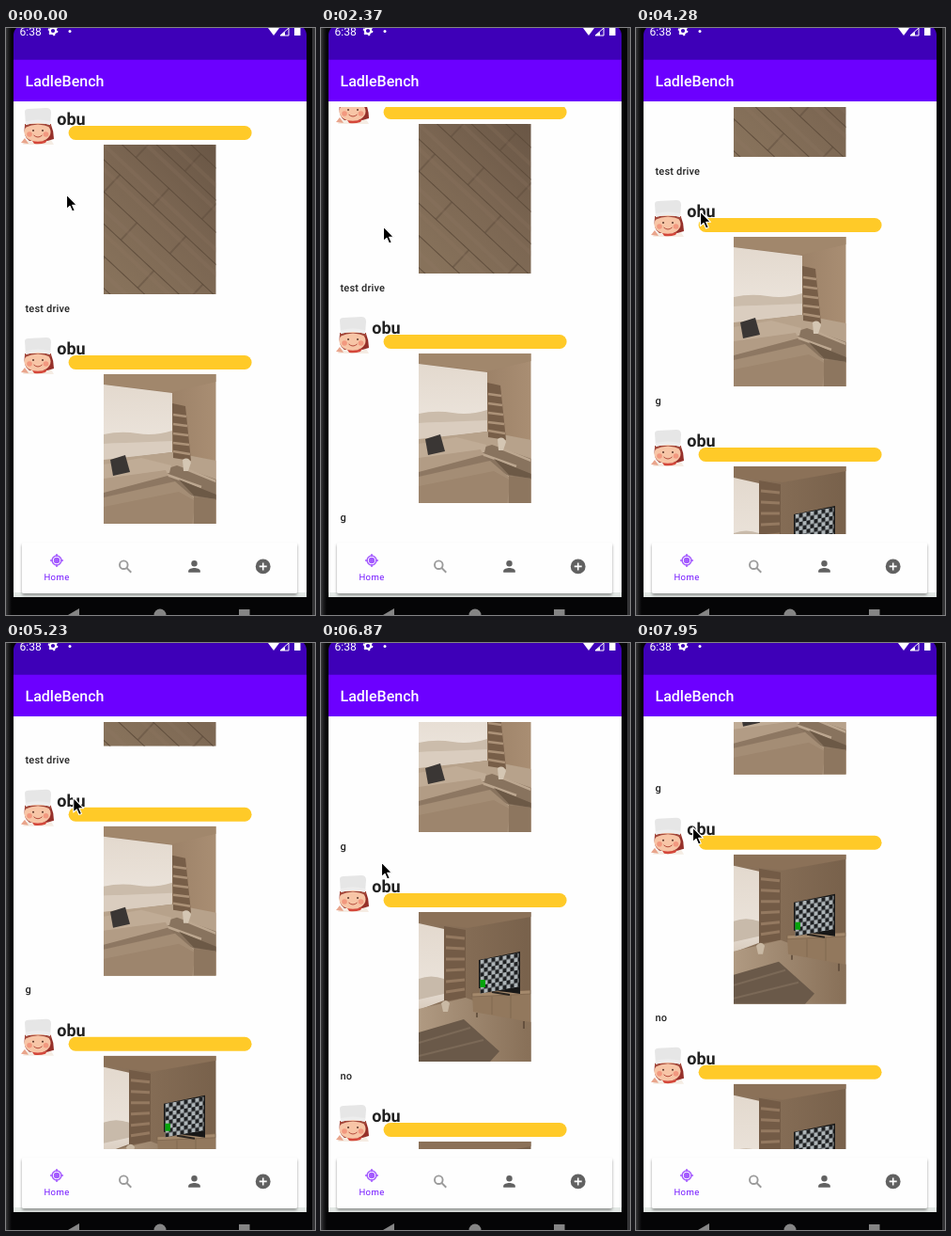
Animation, 329 px wide and 624 px high, one loop 8000 ms. Source, as an HTML page:

```html
<!DOCTYPE html>
<html lang="en">
<head>
<meta charset="utf-8">
<title>Recipe feed</title>
<style>
  html, body { margin: 0; width: 100%; height: 100%; overflow: hidden; background: #000; }
  svg { display: block; width: 329px; height: 624px; font-family: Roboto, sans-serif; text-rendering: geometricPrecision; }
  .name { font-weight: 700; font-size: 18px; fill: #212121; }
  .note { font-weight: 500; font-size: 11px; letter-spacing: .18px; fill: #212121; }
  .title { font-weight: 500; font-size: 16px; fill: #fff; }
  .tab { font-size: 9.5px; letter-spacing: .4px; fill: #7417ff; text-anchor: middle; }
</style>
</head>
<body>
<svg viewBox="0 0 329 624">
  <defs>
    <clipPath id="view"><rect x="8" y="84" width="312" height="454"/></clipPath>
    <clipPath id="photo"><rect width="119.5" height="159"/></clipPath>
    <filter id="shadow" x="-5%" y="-20%" width="110%" height="150%">
      <feDropShadow dx="0" dy="2" stdDeviation="1.8" flood-opacity=".38"/>
    </filter>
    <linearGradient id="bezel">
      <stop offset="0" stop-color="#38383a"/><stop offset=".5" stop-color="#19191b"/><stop offset="1" stop-color="#050506"/>
    </linearGradient>
    <linearGradient id="wood" x1="1" y1="0" x2=".2" y2="1">
      <stop offset="0" stop-color="#695645"/><stop offset=".5" stop-color="#7b6652"/><stop offset="1" stop-color="#87725b"/>
    </linearGradient>
    <linearGradient id="sky" x1="0" y1="0" x2="0" y2="1">
      <stop offset="0" stop-color="#e3d9ce"/><stop offset=".7" stop-color="#eae2d9"/><stop offset="1" stop-color="#d8cbbd"/>
    </linearGradient>
    <linearGradient id="wall"><stop offset="0" stop-color="#8a7058"/><stop offset="1" stop-color="#a98e73"/></linearGradient>
    <linearGradient id="dim"><stop offset="0" stop-color="#8d745c"/><stop offset="1" stop-color="#78614b"/></linearGradient>
    <linearGradient id="boards"><stop offset="0" stop-color="#b09a82"/><stop offset="1" stop-color="#876f57"/></linearGradient>
    <pattern id="planks" width="96" height="50" patternUnits="userSpaceOnUse" patternTransform="translate(3 18) rotate(43)">
      <path d="M0 .5H96M0 25.5H96M20 0V25M68 25V50" fill="none" stroke="#5b4939" stroke-width=".9"/>
      <path d="M0 8H96M0 39H96" stroke="#8e7861" stroke-width="4" opacity=".2"/>
    </pattern>
    <pattern id="check" width="8" height="8" patternUnits="userSpaceOnUse">
      <path d="M0 0H8V8H0Z" fill="#1e2022"/><path d="M0 0H4V4H0ZM4 4H8V8H4Z" fill="#adb4b7"/>
    </pattern>

    <g id="floor" clip-path="url(#photo)">
      <path d="M0 0H120V159H0Z" fill="url(#wood)"/>
      <path d="M0 0H120V159H0Z" fill="url(#planks)"/>
    </g>

    <g id="lounge" clip-path="url(#photo)">
      <path d="M0 0H120V159H0Z" fill="url(#wall)"/>
      <path d="M0 0H120V8L73 19 0 11Z" fill="#a1876c"/>
      <path d="M0 11 73 20V80L0 86Z" fill="url(#sky)"/>
      <path d="M0 64Q18 60 36 63T73 60V72L0 74Z" fill="#cbbcab"/>
      <path d="M0 74 73 71V83L0 92Z" fill="#dacdbf"/>
      <path d="M0 91 73 83 120 92V159H0Z" fill="#b7a28b"/>
      <path d="M73 31 87 34 93 92 74 89Z" fill="#775e48"/>
      <path d="M74 43 88 45M74 53 89 55M74 63 90 65M74 73 91 75M74 82 92 85" stroke="#ac9278" stroke-width="2.500"/>
      <path d="M46 107 78 97 120 112V134L96 130Z" fill="#88735e"/>
      <path d="M62 105 104 120M88 101 120 114" stroke="#bca790" stroke-width="2.500"/>
      <path d="M80 112 120 128V133L96 129Z" fill="#6c5946"/>
      <path d="M84 91Q90 87 93 94L90 103H85Z" fill="#d4c6b3"/>
      <path d="M0 96 40 89 72 97 70 105 0 123Z" fill="#c0ac96"/>
      <path d="M0 111 66 102 70 110 30 123 0 129Z" fill="#b29c85"/>
      <path d="M0 126 68 108 76 115 0 133Z" fill="#8d7762"/>
      <path d="M7 91 23 86 28 104 10 108Z" fill="#3a3634"/>
      <path d="M0 131 76 114 98 133 96 159H0Z" fill="#a48d75"/>
      <path d="M0 141 80 125 98 135 94 159H0Z" fill="#9d856d"/>
      <path d="M96 130 120 133V159H96Z" fill="#8d765f"/>
    </g>

    <g id="den" clip-path="url(#photo)">
      <path d="M0 0H120V159H0Z" fill="url(#dim)"/>
      <path d="M0 0H120V5L52 17 0 11Z" fill="#8b7158"/>
      <path d="M0 12 27 18V94L0 104Z" fill="url(#sky)"/>
      <path d="M0 71Q13 66 27 71V87L0 93Z" fill="#c8baaa"/>
      <path d="M27 15 50 19V91L27 95Z" fill="#735b46"/>
      <path d="M29 26 49 28M29 38 49 39M29 50H49M29 62 49 61M29 74 49 72M29 85 49 82" stroke="#947960" stroke-width="3"/>
      <path d="M0 103 50 91 120 117V159H0Z" fill="url(#boards)"/>
      <path d="M24 97Q29 91 33 97L31 106H26Z" fill="#c9b9a4"/>
      <path d="M0 128 48 114 86 148 76 159H0Z" fill="#6a5949"/>
      <path d="M0 139 55 123M0 153 69 136" stroke="#7b6957" stroke-width="2"/>
      <path d="M57 86 119 83V117L58 106Z" fill="#92785d"/>
      <path d="M57 86 119 83V87L57 90ZM78 90V109M98 88V113" fill="#a4896c" stroke="#7a624b" stroke-width=".7"/>
      <path d="M62 107V112M112 116V124" stroke="#594635" stroke-width="1.500"/>
      <path d="M78 85 97 88" stroke="#29241f" stroke-width="2"/>
      <path d="M64 51 108 42V87L64 81Z" fill="#171717"/>
      <path d="M0 0H41V32H0Z" transform="matrix(1 -.18 0 1.12 65.5 51)" fill="url(#check)"/>
      <path d="M65.500 72H71V80H65.500Z" fill="#05a30b"/>
    </g>

    <g id="chef">
      <path d="M18 40 20 36Q34 31 48 35L51 40Z" fill="#f5ece3"/>
      <path d="M16 38 20 33 24 39Z" fill="#e9a58c"/>
      <path d="M20 19H48Q51 26 51 34L44 36H25Q18 32 20 19Z" fill="#96302a"/>
      <ellipse cx="33.500" cy="26.500" rx="14" ry="10.500" fill="#f7c5a6"/>
      <path d="M20 22Q34 15 48 22V18H20Z" fill="#a2473a"/>
      <path d="M21 19 20 5Q20 2 24 2L43 1Q48 1 48 6L47 19Q34 15 21 19Z" fill="#e6e6e6"/>
      <path d="M21 15Q34 12 47 15V19Q34 15 21 19Z" fill="#ededed"/>
      <circle cx="29" cy="25" r="1" fill="#5a3428"/><circle cx="39" cy="25" r="1" fill="#5a3428"/>
      <circle cx="25" cy="29" r="2.800" fill="#f2987f"/><circle cx="42.500" cy="29" r="2.800" fill="#f2987f"/>
      <path d="M29.500 30Q34 34 38.500 30" fill="none" stroke="#b54b3c"/>
      <path d="M28 36Q35 38 44 35L42 38Q36 40 30 39Z" fill="#d4473a"/>
    </g>

    <g id="head">
      <use href="#chef"/>
      <text class="name" x="54.300" y="19">obu</text>
      <rect x="66.600" y="20" width="195" height="15" rx="7.500" fill="#ffca28"/>
    </g>
  </defs>

  <path d="M0 0H329V624H0Z" fill="#050506"/>
  <path d="M0 0H6V624H0Z" fill="url(#bezel)"/>
  <path d="M326 0H329V624H326Z" fill="#343436"/>
  <path d="M8 0H320V605H8Z" fill="#fefefe"/>
  <path d="M8 0H320V34H8Z" fill="#3e00b8"/>
  <path d="M8 33.700H320V78H8Z" fill="#6c00ff"/>
  <path d="M8 0H11Q8 3 8 8ZM320 0H317Q320 3 320 8Z" fill="#050506"/>

  <g fill="#fff">
    <text x="14.500" y="8" font-size="12">6:38</text>
    <circle cx="50" cy="3" r="3.200" fill="none" stroke="#fff" stroke-width="2.200"/>
    <circle cx="50" cy="3" r="4.600" fill="none" stroke="#fff" stroke-width="1.500" stroke-dasharray="2 2.820"/>
    <circle cx="68" cy="3.500" r="1.500"/>
    <path d="M279 0Q285-4 291 0L285 8Z"/>
    <path d="M301 0V8H292Z" fill="none" stroke="#fff"/><path d="M297 4V8H292Z"/>
    <path d="M307-3H313.500V8H307Z"/>
    <text class="title" x="20.500" y="62">LadleBench</text>
  </g>

  <g clip-path="url(#view)"><g id="feed"></g></g>

  <path d="M8 600H320V605H8Z" fill="#e3e8e5"/>
  <rect x="17" y="547" width="293" height="54" rx="2" fill="#fefefe" filter="url(#shadow)"/>
  <g fill="none" stroke="#a45bff" stroke-width="1.500">
    <circle cx="54" cy="566" r="4.900"/><path d="M54 559V562M54 570V573M47 566H50M58 566H61"/>
    <circle cx="54" cy="566" r="3.200" fill="#a45bff" stroke="none"/>
  </g>
  <text class="tab" x="54" y="587">Home</text>
  <g fill="none" stroke="#9b9b9b" stroke-width="1.900">
    <circle cx="125.300" cy="570.700" r="4.300"/><path d="M128.500 574 133.300 578.700"/>
  </g>
  <g fill="#616161">
    <circle cx="200.500" cy="569.200" r="3.200"/>
    <path d="M194.200 578.800V577.200C194.200 575 198 574 200.500 574S206.800 575 206.800 577.200V578.800Z"/>
    <circle cx="273.700" cy="572.400" r="7.900"/>
  </g>
  <path d="M273.700 568.400V576.400M269.700 572.400H277.700" stroke="#fff" stroke-width="1.600"/>

  <path d="M8 605H320V624H8Z" fill="#050506"/>
  <g fill="#858585">
    <path d="M66 624 78 617V631Z"/><circle cx="164" cy="624" r="6.500"/><path d="M248 618H259.500V630H248Z"/>
  </g>

  <path id="cursor" d="M0 0V15.500L3.500 12.300 6 18 8.700 16.900 6.200 11.300H11Z" fill="#000" stroke="#fff" stroke-width="1.100" stroke-linejoin="round"/>
</svg>
<script>
  const LOOP = 8000, STEP = 118, ITEM = 244;
  const feed = document.getElementById('feed');
  const cursor = document.getElementById('cursor');

  const posts = [['floor', 'test drive'], ['lounge', 'g'], ['den', 'no'], ['den', '']];
  feed.innerHTML = posts.map(([photo, note], i) => `
    <g transform="translate(0 ${84 + i * ITEM})">
      <use href="#head"/>
      <use href="#${photo}" x="104" y="40"/>
      <text class="note" x="20.500" y="217.500">${note}</text>
    </g>`).join('');

  // Each move: first and last update (ms), then pointer x, y and scroll it ends on.
  const start = [64.5, 177, 0];
  const moves = [
    [120, 120, 63, 187, 0],
    [720, 1070, 62, 233, 0],
    [1420, 1890, 61, 269, 0],
    [2250, 2370, 66.5, 211, 22],
    [2490, 2490, 68, 205, 40],
    [2850, 2970, 70, 200, 55.6],
    [3090, 3450, 74.5, 235, 55.6],
    [3570, 3570, 74, 290, 55.6],
    [3690, 4280, 68.5, 195, 146],
    [5110, 5470, 75, 134, 200.5],
    [5700, 6050, 52.5, 345, 200.5],
    [6170, 6170, 48, 395, 200.5],
    [6410, 6870, 64.5, 233, 326],
    [7110, 7230, 64, 258, 326],
    [7350, 7830, 59, 191, 387.2],
    [7950, 7950, 60.5, 196, 387.2]
  ];

  // The screen refreshes in discrete steps, so progress is counted in whole updates.
  function poseAt(t) {
    let pose = start;
    for (const [from, to, ...end] of moves) {
      if (t < from) break;
      const count = Math.round((to - from) / STEP) + 1;
      const gap = count > 1 ? (to - from) / (count - 1) : 1;
      const k = Math.min(1, (Math.floor((t - from) / gap + 0.01) + 1) / count);
      pose = pose.map((v, i) => v + (end[i] - v) * k);
    }
    return pose;
  }

  function draw(now) {
    const [x, y, scroll] = poseAt(now % LOOP);
    feed.setAttribute('transform', `translate(0 ${-scroll})`);
    cursor.setAttribute('transform', `translate(${x} ${y})`);
    requestAnimationFrame(draw);
  }
  draw(performance.now());
</script>
</body>
</html>
```
